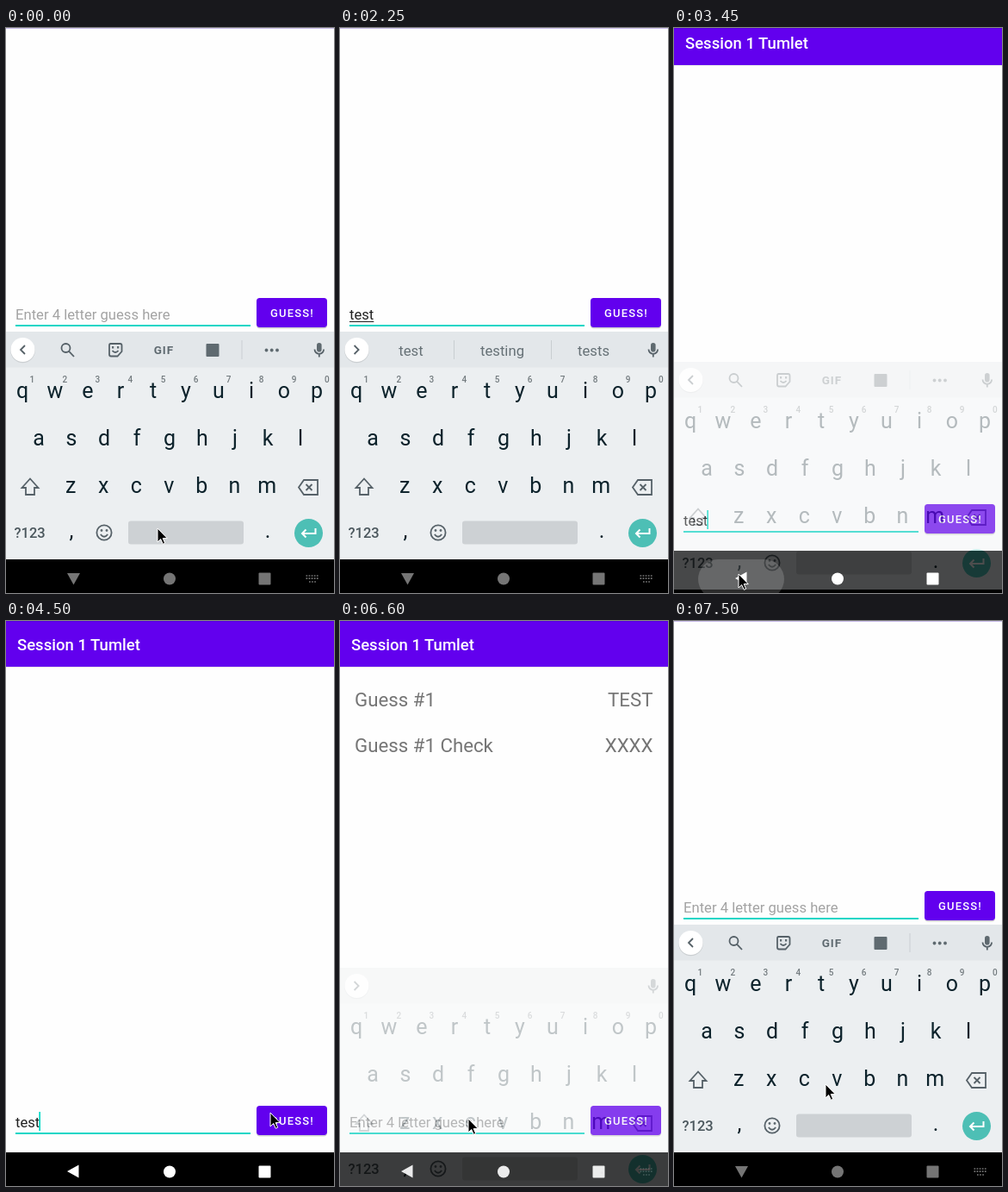
Animation of 381x655 px, one loop 8 s. Source, as an HTML page:

```html
<!DOCTYPE html>
<html lang="en">
<head>
<meta charset="utf-8">
<title>Word guessing on a phone</title>
<style>
  html, body { margin: 0; width: 100%; height: 100%; overflow: hidden; background: #000; }
  svg { display: block; width: 381px; height: 655px; }
  text { font-family: Roboto, Arial, sans-serif; white-space: pre; }
  .list { font-size: 22.25px; fill: #757575; }
  .field { font-size: 16.65px; }
  .key { font-size: 25px; fill: #0c222b; text-anchor: middle; }
  .digit { font-size: 10px; font-weight: 500; fill: #737b7f; text-anchor: middle; }
  .word { font-size: 16.7px; fill: #667176; text-anchor: middle; }
  .line { fill: none; stroke: #566168; stroke-width: 1.8; }
  .solid { fill: #5f6a70; }
</style>
</head>
<body>
<svg viewBox="0 0 381 655">
  <rect width="381" height="655"/>

  <g id="app">
    <rect width="381" height="616" fill="#fefefe"/>
    <rect y="53" width="381" height="1" fill="#000" opacity=".08"/>
    <rect width="381" height="53" fill="#6200ee"/>
    <text x="13" y="34" font-size="18.5" font-weight="500" fill="#fff">Session 1 Tumlet</text>
    <g id="guesses" class="list">
      <text x="17" y="99">Guess #1</text>
      <text x="363.5" y="99" text-anchor="end">TEST</text>
      <text x="17" y="152">Guess #1 Check</text>
      <text x="363.5" y="152" text-anchor="end">XXXX</text>
    </g>
    <text id="hint" class="field" x="11" y="586.5" fill="#a3a3a3">Enter 4 letter guess here</text>
    <text id="typed" class="field" x="11" y="586.5" fill="#212121"></text>
    <rect id="under" x="11" y="589" height="1" fill="#212121"/>
    <rect id="caret" y="569" width="1.7" height="22" fill="#03dac5"/>
    <rect x="11" y="593" width="273" height="2" fill="#12d6c6"/>
    <rect x="291" y="563" width="82" height="34.5" rx="4" opacity=".18"/>
    <rect x="291" y="562" width="82" height="34" rx="3.7" fill="#6200ee"/>
    <rect id="press" x="291" y="562" width="82" height="34" rx="3.7" fill="#fff"/>
    <text x="332.5" y="584" font-size="13" font-weight="500" letter-spacing="1.15" fill="#fff" text-anchor="middle">GUESS!</text>
  </g>
  <rect width="381" height="1" fill="#3700b3" opacity=".25"/>

  <g id="board">
    <rect y="352" width="381" height="264" fill="#eceff1"/>
    <rect y="352" width="381" height="41.5" fill="#e3e7ea"/>
    <circle cx="19.5" cy="374" r="14.3" opacity=".1"/>
    <circle cx="19.5" cy="373" r="14" fill="#fff"/>
    <path id="chevron" class="line" d="M22 368 L17 373 L22 378"/>
    <g id="tools">
      <path class="line" d="M64.5 371 a5 5 0 1 0 10 0 a5 5 0 1 0 -10 0 M73.2 374.8 L79 381"/>
      <path class="line" d="M121.5 366 H132.5 Q134.5 366 134.5 368 V375 L129.500 380.500 H122 Q120 380.500 120 378.500 V368 Q120 366 121.500 366 M123.500 374 Q127 378 130.500 374"/>
      <path class="solid" d="M123 369 h2.200 v2.400 h-2.200 z M129 369 h2.200 v2.400 h-2.200 z"/>
      <text class="solid" x="183.400" y="378" font-size="13.500" font-weight="700" letter-spacing=".9" text-anchor="middle">GIF</text>
      <rect class="solid" x="232.500" y="366" width="15" height="15" rx="1"/>
      <rect x="273.500" y="362" width="1" height="22" fill="#c9ced1"/>
      <g class="solid">
        <circle cx="302.500" cy="373.500" r="1.900"/><circle cx="308.700" cy="373.500" r="1.900"/><circle cx="315" cy="373.500" r="1.900"/>
      </g>
    </g>
    <g id="words">
      <text class="word" x="82.500" y="379.500"></text>
      <text class="word" x="188.500" y="379.500"></text>
      <text class="word" x="294.500" y="379.500"></text>
      <path d="M132.500 362 V384 M245.500 362 V384" stroke="#c9ced1"/>
    </g>
    <rect class="solid" x="361" y="365" width="5.600" height="10.500" rx="2.800"/>
    <path class="line" stroke-width="1.500" d="M358.500 372.500 a5.300 5.300 0 0 0 10.600 0 M363.800 377.500 V381.500"/>
    <g id="keys"></g>
    <path class="line" d="M28 522.500 L37.500 533 H33 V541 H23 V533 H18.500 Z"/>
    <path class="line" d="M346 524 H362 V541 H346 L340 532.500 Z M348.500 529 L355.500 536 M355.500 529 L348.500 536"/>
    <text x="9.500" y="591" font-size="16.500" font-weight="500" fill="#4b575d">?123</text>
    <circle class="line" cx="114" cy="585" r="8.600"/>
    <path class="line" d="M109.800 587 Q114 592.500 118.200 587"/>
    <g class="solid"><circle cx="111" cy="582.500" r="1.400"/><circle cx="117" cy="582.500" r="1.400"/></g>
    <rect x="142" y="571.500" width="134" height="27" rx="3" fill="#cdd1d4"/>
    <circle cx="351.500" cy="585.500" r="16.500" fill="#4dbfb5"/>
    <path d="M359.500 580 V586 H344.500 M348.500 581.500 L344 586 L348.500 590.500" fill="none" stroke="#fff" stroke-width="2"/>
    <rect y="616" width="381" height="90"/>
  </g>

  <rect id="ripple" x="28" y="616" width="100" height="46" rx="23" fill="#fff"/>
  <g id="nav" fill="#fff">
    <path id="back" d="M71 638 L84.500 630.500 V645.500 Z"/>
    <circle cx="190" cy="638.500" r="7"/>
    <rect x="293.500" y="631.500" width="14" height="14" rx="1"/>
  </g>
  <path id="switcher" stroke="#fff" stroke-width="1.700" fill="none" stroke-dasharray="1.700 1.400"
    d="M348.500 635 H363.500 M348.500 638.200 H363.500 M352 642 H360"/>

  <path id="mouse" d="M0 0 V16 L3.700 12.500 L6.300 18.300 L8.700 17.200 L6.200 11.600 H11.300 Z" fill="#000" stroke="#fff" stroke-width="1"/>
</svg>

<script>
const LOOP = 8000, TICK = 150, PAN = 249;
const $ = id => document.getElementById(id);
const set = (id, attrs) => { for (const k in attrs) $(id).setAttribute(k, attrs[k]); };

// Latest row whose time has come.
const at = (rows, t) => rows.filter(r => r[0] <= t).pop();

// Eased position between timed rows.
function glide(rows, t) {
  const a = at(rows, t), b = rows[rows.indexOf(a) + 1] || a;
  const p = b === a ? 0 : (t - a[0]) / (b[0] - a[0]);
  return [1, 2].map(i => a[i] + (b[i] - a[i]) * p);
}

const typing = [[0, ''], [900, 't'], [1050, 'te'], [1200, 'tes'], [1500, 'test'], [5100, '']];
const words = {
  t: ['t', 'the', 'to'],
  te: ['te', 'tell', 'ten'],
  tes: ['tes', 'test', 'tests'],
  test: ['test', 'testing', 'tests']
};
const strip = [[0, 'tools'], [900, 'words'], [3300, 'tools'], [6600, 'empty'], [7050, 'tools']];
const caret = [[0, 0], [300, 1], [1950, 0], [2400, 1], [3000, 0], [3450, 1], [4050, 0],
  [4500, 1], [5550, 0], [6000, 1], [6600, 0], [7050, 1], [7500, 0]];
// time, keyboard drop, keyboard opacity, app pan
const slide = [[0, 0, 1, PAN], [3300, 12, .8, 150], [3450, 35, .3, 10], [3600, 48, .05, 0], [3750, 50, 0, 0],
  [6600, 50, .25, 0], [6750, 42.5, .64, 100], [6900, 5, .95, 238], [7050, 0, 1, PAN]];
// time, icon opacity, back turn, switcher opacity
const nav = [[0, .46, -90, .46], [3300, .8, -45, .2], [3450, 1, 0, 0], [6600, .9, 0, .2],
  [6750, .6, 0, .6], [6900, .5, -60, .5], [7050, .46, -90, .46]];
const ripple = [[0, 0], [3300, .15], [3450, .17], [3600, .08], [3750, 0]];
const press = [[0, 0], [4950, .2], [5100, .12], [5250, 0]];
const mouse = [[0, 176, 580], [1800, 176, 580], [2100, 150, 642], [2250, 122, 660], [2400, 98, 652],
  [2550, 82, 640], [2850, 75, 633], [3900, 75, 633], [4500, 307, 570], [4650, 318, 573], [5700, 318, 573],
  [6150, 160, 578], [6450, 149, 577], [6750, 149, 577], [7500, 176, 537]];

function addKey(cls, x, y, char) {
  const el = document.createElementNS('http://www.w3.org/2000/svg', 'text');
  el.setAttribute('class', cls);
  el.setAttribute('x', x);
  el.setAttribute('y', y);
  el.textContent = char;
  $('keys').append(el);
}
[['qwertyuiop', 19, 429], ['asdfghjkl', 38, 484], ['zxcvbnm', 75.3, 538.5]].forEach(([row, x, y]) =>
  [...row].forEach((c, i) => addKey('key', x + 38 * i, y, c)));
[...'1234567890'].forEach((c, i) => addKey('digit', 30.3 + 38.05 * i, 411, c));
addKey('key', 76, 591, ',');
addKey('key', 304, 591, '.');

function draw(t) {
  const [, drop, alpha, pan] = at(slide, t);
  set('app', { transform: `translate(0 ${-pan})` });
  set('board', { transform: `translate(0 ${drop})`, opacity: alpha });

  const text = at(typing, t)[1];
  $('typed').textContent = text;
  const width = text ? $('typed').getComputedTextLength() : 0;
  set('hint', { opacity: text ? 0 : 1 });
  set('under', { width, opacity: t < 3300 ? 1 : 0 });
  set('caret', { x: 11 + Math.max(0, width - 1), opacity: at(caret, t)[1] });
  set('guesses', { opacity: t >= 5100 ? 1 : 0 });
  set('press', { opacity: at(press, t)[1] });

  const mode = at(strip, t)[1];
  set('tools', { opacity: mode === 'tools' ? 1 : 0 });
  set('words', { opacity: mode === 'words' ? 1 : 0 });
  set('chevron', { transform: mode === 'tools' ? '' : 'rotate(180 19.3 373)' });
  $('words').querySelectorAll('text').forEach((el, i) => el.textContent = text ? words[text][i] : '');

  const [, icons, turn, switcher] = at(nav, t);
  set('nav', { opacity: icons });
  set('back', { transform: `rotate(${turn} 78.500 638)` });
  set('switcher', { opacity: switcher });
  set('ripple', { opacity: at(ripple, t)[1] });
  set('mouse', { transform: `translate(${glide(mouse, t)})` });
}

const start = performance.now();
function frame() {
  const t = (performance.now() - start) % LOOP;
  draw(Math.floor(t / TICK) * TICK);
  requestAnimationFrame(frame);
}
frame();
</script>
</body>
</html>
```
